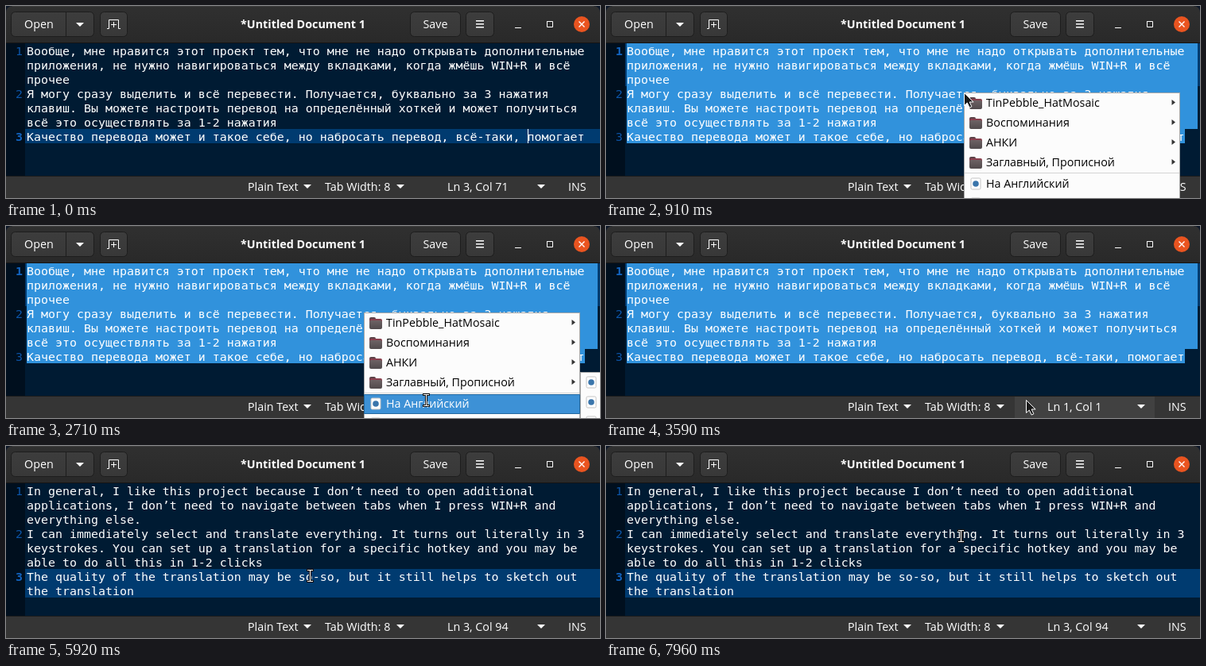
Write an HTML page with a canvas that moves like this. It is 747 by 242 pixels and loops after 8000 ms.

```html
<!DOCTYPE html>
<html lang="en">
<head>
<meta charset="utf-8">
<title>Text editor translation</title>
<style>
html, body { margin: 0; width: 100%; height: 100%; overflow: hidden; background: #0b1526; }
canvas { display: block; }
</style>
</head>
<body>
<canvas id="stage" width="747" height="242"></canvas>
<script>
const ctx = document.getElementById('stage').getContext('2d');
const W = 747, H = 242, LOOP = 8000;
const UI = '500 14.3px "Open Sans", "Noto Sans", sans-serif';
const UI_BOLD = 'bold 14.35px "Open Sans", "Noto Sans", sans-serif';
const MONO = '14.95px "DejaVu Sans Mono", monospace';
const ROW = 18, BASELINE = 15, TEXT_TOP = 47, TEXT_X = 26, TEXT_RIGHT = 744, GUTTER = 24;
const EDITOR_TOP = 47, STATUS_TOP = 214;

const TIME = { select: 400, pointer: 870, menu: 910, submenu: 1780, press: 2440, close: 2760, paste: 4300 };
const CARET_OFF = [[5500, 6060], [6700, 7270], [7870, 8000]];

const RUSSIAN = [
  'Вообще, мне нравится этот проект тем, что мне не надо открывать дополнительные',
  'приложения, не нужно навигироваться между вкладками, когда жмёшь WIN+R и всё',
  'прочее',
  'Я могу сразу выделить и всё перевести. Получается, буквально за 3 нажатия',
  'клавиш. Вы можете настроить перевод на определённый хоткей и может получиться',
  'всё это осуществлять за 1-2 нажатия',
  'Качество перевода может и такое себе, но набросать перевод, всё-таки, помогает'
];
const ENGLISH = [
  'In general, I like this project because I don’t need to open additional',
  'applications, I don’t need to navigate between tabs when I press WIN+R and',
  'everything else.',
  'I can immediately select and translate everything. It turns out literally in 3',
  'keystrokes. You can set up a translation for a specific hotkey and you may be',
  'able to do all this in 1-2 clicks',
  'The quality of the translation may be so-so, but it still helps to sketch out',
  'the translation'
];

const MENU = { x: 450, y: 109, right: 722 };
const MENU_ITEMS = [
  { label: 'TinPebble_HatMosaic', top: 110, folder: true },
  { label: 'Воспоминания', top: 135, folder: true },
  { label: 'АНКИ', top: 160, folder: true },
  { label: 'Заглавный, Прописной', top: 185, folder: true },
  { label: 'На Английский', top: 212 },
  { label: '', top: 237 }
];

// Pointer hotspot: time, x, y
const POINTER_PATH = [
  [0, 450, 109], [1420, 450, 109], [1600, 418, 150], [1800, 472, 196], [2080, 528, 219],
  [5140, 528, 219], [5920, 382, 163], [5960, 382, 163], [6460, 446, 113], [LOOP, 446, 113]
];

function rect(x, y, w, h, fill) {
  ctx.fillStyle = fill;
  ctx.fillRect(x, y, w, h);
}

function text(str, x, y, font = UI, color = '#fff', align = 'left') {
  ctx.font = font;
  ctx.fillStyle = color;
  ctx.textAlign = align;
  ctx.fillText(str, x, y);
}

function shape(points, fill) {
  ctx.beginPath();
  points.forEach(([x, y]) => ctx.lineTo(x, y));
  ctx.closePath();
  ctx.fillStyle = fill;
  ctx.fill();
}

function lines(color, width, ...paths) {
  ctx.strokeStyle = color;
  ctx.lineWidth = width;
  ctx.beginPath();
  for (const path of paths) path.forEach(([x, y], i) => i ? ctx.lineTo(x, y) : ctx.moveTo(x, y));
  ctx.stroke();
}

function rounded(x, y, w, h, r, fill) {
  ctx.beginPath();
  ctx.roundRect(x, y, w, h, r);
  ctx.fillStyle = fill;
  ctx.fill();
}

function outline(color, width = 1) {
  ctx.strokeStyle = color;
  ctx.lineWidth = width;
  ctx.stroke();
}

function shade(y0, y1, top, bottom) {
  const g = ctx.createLinearGradient(0, y0, 0, y1);
  g.addColorStop(0, top);
  g.addColorStop(1, bottom);
  return g;
}

function disc(x, y, r, fill) {
  ctx.beginPath();
  ctx.arc(x, y, r, 0, Math.PI * 2);
  ctx.fillStyle = fill;
  ctx.fill();
}

const downArrow = (x, y) => shape([[x - 5, y - 2.5], [x + 5, y - 2.5], [x, y + 2.5]], '#fff');

function button(x, w) {
  rounded(x + 0.5, 7.5, w - 1, 31, 5, shade(7, 39, '#3d3d3d', '#383838'));
  outline('#1d1d1d');
}

function drawHeader() {
  rect(0, 0, W, EDITOR_TOP, '#0b1526');
  rounded(0, 0, W, EDITOR_TOP, [8, 8, 0, 0], shade(0, EDITOR_TOP, '#303030', '#292929'));
  rect(8, 0, W - 16, 1, '#3c3c3c');
  rect(0, EDITOR_TOP - 1, W, 1, '#151515');

  button(6, 105);
  rect(75, 8, 1, 30, '#1d1d1d');
  text('Open', 23, 28);
  downArrow(93, 23.5);

  button(118, 35);
  lines('#fff', 1, [[127, 28.5], [129.5, 28.5], [129.5, 17.5], [141.5, 17.5], [141.5, 28.5], [144, 28.5]],
    [[135.5, 20], [135.5, 27]], [[132, 23.5], [139, 23.5]]);

  text('*Untitled Document 1', 373.5, 28, UI_BOLD, '#fff', 'center');

  button(508, 64);
  text('Save', 540, 28, UI, '#fff', 'center');

  button(578, 36);
  for (const y of [18, 22, 26]) rect(591, y, 10, 1.5, '#fff');

  rect(640, 27, 8, 1, '#fff');
  lines('#fff', 1, [[680.5, 19.5], [687.5, 19.5], [687.5, 26.5], [680.5, 26.5], [680.5, 19]]);
  disc(724, 23, 10, '#e95420');
  lines('#fff', 1.4, [[720.5, 19.5], [727.5, 26.5]], [[727.5, 19.5], [720.5, 26.5]]);
}

function caretVisible(t) {
  if (t < TIME.select) return true;
  return t >= TIME.paste && !CARET_OFF.some(([from, to]) => t >= from && t < to);
}

function drawEditor(t) {
  const translated = t >= TIME.paste;
  const selected = t >= TIME.select && !translated;
  const rows = translated ? ENGLISH : RUSSIAN;
  const activeLine = selected ? 1 : 3;
  const firstRow = (activeLine - 1) * 3;
  const rowCount = Math.min(3, rows.length - firstRow);
  const rowY = r => TEXT_TOP + r * ROW;

  rect(0, EDITOR_TOP, W, STATUS_TOP - EDITOR_TOP, '#001b33');
  rect(0, EDITOR_TOP, GUTTER, STATUS_TOP - EDITOR_TOP, '#000f1e');
  rect(GUTTER, rowY(firstRow), W - GUTTER, rowCount * ROW, '#003b70');

  if (selected) {
    rect(TEXT_X, rowY(0), TEXT_RIGHT - TEXT_X, 6 * ROW, '#3192dc');
    rect(TEXT_X, rowY(6), 728 - TEXT_X, ROW, '#3192dc');
  }

  [1, 2, 3].forEach((n, i) => {
    const font = n === activeLine ? 'bold ' + MONO : MONO;
    text(n, 21, rowY(i * 3) + BASELINE, font, n === activeLine ? '#1264c0' : '#0c55a8', 'right');
  });
  rows.forEach((row, r) => text(row, TEXT_X, rowY(r) + BASELINE, MONO));

  if (caretVisible(t)) {
    if (translated) rect(161, rowY(7), 1, ROW, '#fff');
    else rect(656, rowY(6), 1, ROW, '#fff');
  }
}

function drawStatus(t, pointer) {
  rect(0, STATUS_TOP, W, H - STATUS_TOP, '#353535');
  const hover = t >= TIME.close && pointer.y > STATUS_TOP && pointer.x > 514 && pointer.x < 690;
  if (hover) rect(514, STATUS_TOP, 176, H - STATUS_TOP, '#414141');
  rect(0, STATUS_TOP, W, 1, '#1c1c1c');

  const position = t < TIME.select ? 'Ln 3, Col 71' : t < TIME.paste ? 'Ln 1, Col 1' : 'Ln 3, Col 94';
  text('Plain Text', 304, 233);
  downArrow(379, 227.5);
  text('Tab Width: 8', 401, 233);
  downArrow(496, 227.5);
  text(position, 555, 233);
  downArrow(673, 227.5);
  text('INS', 707, 233);
}

function drawFolder(x, y) {
  rounded(x, y - 7, 8, 6, 2, '#5b4348');
  rounded(x, y - 5, 16, 8, 2, '#8a3f4d');
  rounded(x, y - 3, 16, 11, 2, shade(y - 3, y + 8, '#6d6264', '#514a4c'));
}

function drawScript(x, y) {
  rounded(x - 6, y - 7, 12, 14, 1.5, '#fff');
  outline('#c4c4c4');
  disc(x, y, 3.8, '#3a75ab');
}

function panel(x, y, w) {
  rect(x, y, w, H - y, '#a8a8a8');
  rect(x + 1, y + 1, w - 2, H - y, '#fcfcfc');
}

function drawMenu(t, pointer) {
  const width = MENU.right - MENU.x;
  panel(MENU.x, MENU.y, width);
  rect(MENU.x + 1, 210, width - 2, 1, '#d4d4d4');

  for (const { label, top, folder } of MENU_ITEMS) {
    const mid = top + 12;
    const inside = pointer.x > MENU.x && pointer.x < MENU.right;
    const active = inside && pointer.y >= top && pointer.y < top + 25;
    const ink = active ? '#fff' : '#000';
    if (active) {
      rounded(MENU.x + 0.5, top + 0.5, width - 1, 24, 0, '#3d91d6');
      outline('#22689f');
    }
    if (folder) {
      drawFolder(457, mid);
      shape([[711.5, mid - 4], [716, mid - 0.5], [711.5, mid + 3]], active ? '#fff' : '#333');
    } else {
      drawScript(465, mid);
    }
    text(label, 478, mid + 5, UI, ink);
  }

  if (t >= TIME.submenu) {
    panel(MENU.right, 184, 40);
    for (const y of [197, 222, 247]) drawScript(736, y);
  }
}

function pointerAt(t) {
  const i = POINTER_PATH.findIndex(key => key[0] > t);
  const [t0, x0, y0] = POINTER_PATH[i - 1], [t1, x1, y1] = POINTER_PATH[i];
  const p = (t - t0) / (t1 - t0), e = p * p * (3 - 2 * p);
  return { x: Math.round(x0 + (x1 - x0) * e), y: Math.round(y0 + (y1 - y0) * e) };
}

function drawArrow() {
  ctx.lineJoin = 'round';
  shape([[0, 0], [0, 16], [3.8, 12.6], [6.6, 18.6], [9.4, 17.3], [6.7, 11.5], [11.6, 11.5]], '#1a1a1a');
  outline('#fff');
}

function drawBeam() {
  const bar = [[[0, -7], [0, 7]], [[-3, -7], [3, -7]], [[-3, 7], [3, 7]]];
  ctx.lineCap = 'square';
  lines('#111', 3, ...bar);
  lines('#fff', 1, ...bar);
}

function drawPointer(t, { x, y }) {
  const pressed = t >= TIME.press && t < TIME.close;
  const overText = t >= TIME.close && y > EDITOR_TOP && y < STATUS_TOP;
  ctx.save();
  ctx.translate(x + 0.5, y + 0.5);
  if (pressed || overText) drawBeam();
  else drawArrow();
  ctx.restore();
}

function draw(t) {
  const pointer = pointerAt(t);
  drawHeader();
  drawEditor(t);
  drawStatus(t, pointer);
  if (t >= TIME.menu && t < TIME.close) drawMenu(t, pointer);
  if (t >= TIME.pointer) drawPointer(t, pointer);
}

const start = performance.now();
function tick() {
  draw((performance.now() - start) % LOOP);
  requestAnimationFrame(tick);
}
tick();
</script>
</body>
</html>
```
